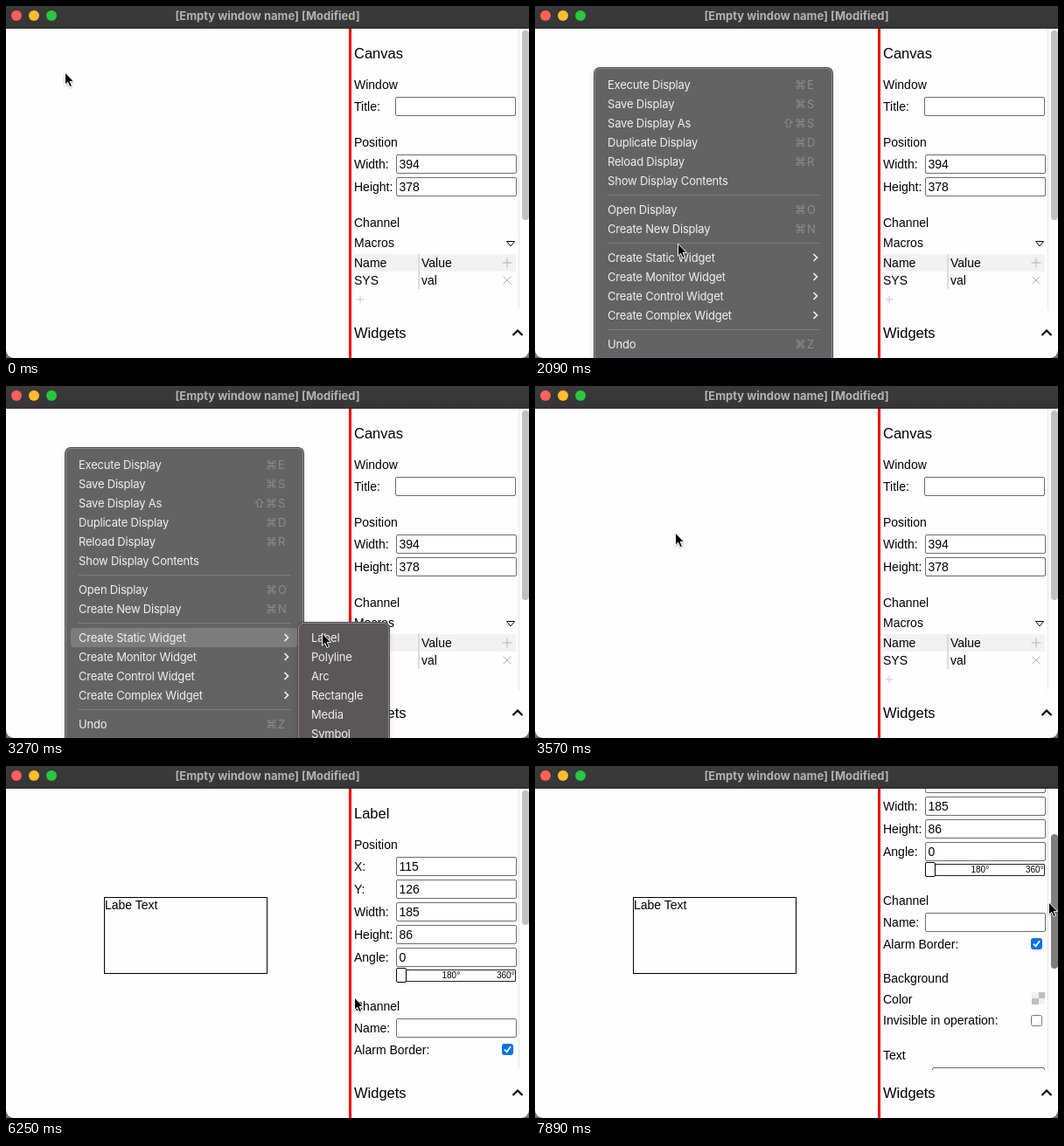
Write an HTML page that moves like this. It is 598 by 403 pixels and loops after 8000 ms.

```html
<!DOCTYPE html>
<html lang="en">
<head>
<meta charset="utf-8">
<title>Display editor</title>
<style>
html, body { margin: 0; width: 100%; height: 100%; overflow: hidden; background: #6d6d6d; }
#win { position: absolute; left: 0; top: 0; width: 598px; height: 403px; overflow: hidden;
  background: #fefefe; border-radius: 0 0 9px 9px; color: #000;
  font: 14px/20px "Liberation Sans", Arial, sans-serif; cursor: default; }
#win div, #win svg, #win i { position: absolute; box-sizing: border-box; white-space: nowrap; }
#bar { left: 0; top: 0; width: 598px; height: 26px; background: linear-gradient(#393a39, #353635);
  border-bottom: 1px solid #2a2b2a; color: #b4b4b3; text-align: center;
  font: 700 13px/22px Inter, sans-serif; }
.light { top: 5px; width: 12px; height: 12px; border-radius: 50%; }
#split { left: 392px; top: 26px; width: 3px; height: 377px; background: #f00; }
#clip { left: 395px; top: 26px; width: 203px; height: 322px; overflow: hidden; background: #fefefe; }
.page { left: -395px; top: -26px; width: 598px; height: 600px; }
.head { font-size: 16.5px; }
.field { width: 138px; height: 22px; border: 1px solid #6c6c6c; border-radius: 2px;
  background: #fff; padding-left: 3px; }
.check { left: 567px; width: 13px; height: 13px; border: 1px solid #767676; border-radius: 2.5px; background: #fff; }
.check.on { background: #0b72e7; border-color: #0b72e7; }
.tick { font-size: 10px; }
#track { left: 191px; top: 0; width: 12px; height: 322px; background: #fefefe; border-left: 1px solid #e6e6e6; }
#thumb { left: 590px; width: 8px; border-radius: 4px; }
#label { top: 150px; border: 1px solid #000; overflow: hidden; line-height: 16px; }
.menu { border: 1px solid #8b8c8e; border-radius: 6px; height: 400px; color: #f1f1f1;
  font: 13px/22px Inter, sans-serif; letter-spacing: -.2px;
  box-shadow: 0 0 0 1px #4a4b4d, 0 2px 9px rgba(0, 0, 0, .12); }
#main { left: 68px; top: 71px; width: 272px; background: #626365; }
#sub { left: 334px; top: 271px; width: 104px; background: #5b5658; }
.row { left: 5px; right: 5px; height: 22px; padding-left: 9px; border-radius: 4px; }
.row i { font-style: normal; color: #8b8c8e; top: 0; }
.row.hot { background: #3a76d8; color: #fff; }
.row.dim { background: #7b7c7e; }
.sep { left: 14px; right: 14px; height: 1px; background: #7e7f81; }
#win svg { overflow: visible; fill: none; }
</style>
</head>
<body>
<div id="win">
  <div id="bar">[Empty window name] [Modified]</div>
  <div class="light" style="left:6px;background:#fe5f58"></div>
  <div class="light" style="left:26px;background:#febc2e"></div>
  <div class="light" style="left:46px;background:#28c840"></div>
  <div id="label">Labe Text</div>
  <div id="split"></div>
  <div id="clip">
    <div class="page" id="canvasPage"></div>
    <div class="page" id="labelPage"></div>
    <div id="track"></div>
  </div>
  <div id="thumb"></div>
  <div id="foot"></div>
  <div id="menus">
    <div class="menu" id="main"></div>
    <div class="menu" id="sub"></div>
  </div>
  <svg id="arrow" width="12" height="18" style="left:0;top:0;filter:drop-shadow(0 1px 1px rgba(0,0,0,.3))">
    <path d="M.5 0V14.3L3.7 11.3L6 16.6L8.5 15.5L6.2 10.4H10.6Z" fill="#000" stroke="#fff"/>
  </svg>
</div>
<script>
const $ = id => document.getElementById(id);

function add(parent, cls, style, text = '', tag = 'div') {
  const el = document.createElement(tag);
  el.className = cls;
  for (const k in style) el.style[k] = typeof style[k] === 'number' ? style[k] + 'px' : style[k];
  el.textContent = text;
  parent.append(el);
  return el;
}
// Text is placed by its left edge and the middle of its line.
const text = (parent, x, cy, str, cls = '') => add(parent, cls, { left: x, top: cy - 10 }, str);
const field = (parent, cy, value = '', x = 445.5) =>
  add(parent, 'field', { left: x, top: cy - 11 }, value);
const icon = (parent, d, color, width = 1) => parent.insertAdjacentHTML('beforeend',
  `<svg width="1" height="1" style="left:0;top:0"><path d="${d}" stroke="${color}" stroke-width="${width}"/></svg>`);
const box = (parent, x, y, w, h, color) =>
  add(parent, '', { left: x, top: y, width: w, height: h, background: color });

// Canvas properties
const cp = $('canvasPage');
text(cp, 398, 54, 'Canvas', 'head');
text(cp, 398, 90, 'Window');
text(cp, 398, 115, 'Title:');
field(cp, 115, '', 444.5);
text(cp, 398, 156, 'Position');
text(cp, 398, 181, 'Width:');
field(cp, 181, '394');
text(cp, 398, 207, 'Height:');
field(cp, 207, '378');
text(cp, 398, 248, 'Channel');
text(cp, 398, 271, 'Macros');
icon(cp, 'M572.5 269.5H581.5L577 275Z', '#000');
box(cp, 398, 284, 185, 20, '#f2f2f2');
box(cp, 471, 284, 1.5, 40, '#dcdcdc');
text(cp, 398, 294, 'Name');
text(cp, 475, 294, 'Value');
text(cp, 398, 313.5, 'SYS');
text(cp, 475, 313.5, 'val');
icon(cp, 'M567.5 294H578.5M573 288.5V299.5M568.5 309.5L577.5 318.5M577.5 309.5L568.5 318.5', '#b4b4b4');
icon(cp, 'M400.5 336H409.5M405 331.5V340.5', '#c8c8c8');

// Label properties
const lp = $('labelPage');
text(lp, 398, 54, 'Label', 'head');
text(lp, 398, 90, 'Position');
const [xIn, yIn, wIn, hIn, aIn] = ['X:', 'Y:', 'Width:', 'Height:', 'Angle:'].map((name, i) => {
  const cy = 115 + i * 26;
  text(lp, 398, cy, name);
  return field(lp, cy);
});
yIn.textContent = '126';
aIn.textContent = '0';
add(lp, '', { left: 446, top: 233, width: 137, height: 14, border: '1px solid #222', borderRadius: 1 });
add(lp, '', { left: 446, top: 231, width: 12, height: 17, border: '1px solid #000', borderRadius: 2, background: '#fff' });
text(lp, 498.5, 239.5, '180°', 'tick');
text(lp, 561, 239.5, '360°', 'tick');
text(lp, 398, 275, 'Channel');
text(lp, 398, 300, 'Name:');
field(lp, 300);
text(lp, 398, 324.5, 'Alarm Border:');
add(lp, 'check on', { top: 318 });
icon(lp, 'M570 324.7L572.6 327.3L577 321.2', '#fff', 1.8);
text(lp, 398, 364, 'Background');
text(lp, 398, 388, 'Color');
box(lp, 568, 380, 15, 14, '#f2f2f2');
box(lp, 575.5, 380, 7.5, 7, '#bebebe');
box(lp, 568, 387, 7.5, 7, '#bebebe');
text(lp, 398, 412, 'Invisible in operation:');
add(lp, 'check', { top: 405.5 });
text(lp, 398, 451.5, 'Text');
field(lp, 477, '', 453.5).style.width = '129px';

text($('foot'), 398, 374, 'Widgets', 'head');
icon($('foot'), 'M579.5 377L585 371.5L590.5 377', '#000', 2.2);

// Menus: "name|shortcut", ">" opens a submenu, "-" is a separator
function fillMenu(menu, first, items) {
  const top = parseInt(getComputedStyle(menu).top) + 1;
  const rows = [];
  let cy = first;
  for (const item of items) {
    if (item === '-') {
      add(menu, 'sep', { top: cy - 6 - top });
      cy += 11;
      continue;
    }
    const [name, key = ''] = item.split('|');
    const el = add(menu, 'row', { top: cy - 11 - top }, name);
    if (key === '>') icon(el, 'M244.5 7L248.5 11L244.5 15', '#f1f1f1', 1.7);
    else [...key].reverse().forEach((ch, i) => add(el, '', { left: [237, 223, 209][i] }, ch, 'i'));
    rows.push({ el, cy });
    cy += 22;
  }
  return rows;
}
const mainRows = fillMenu($('main'), 89.5, [
  'Execute Display|⌘E', 'Save Display|⌘S', 'Save Display As|⇧⌘S', 'Duplicate Display|⌘D',
  'Reload Display|⌘R', 'Show Display Contents', '-', 'Open Display|⌘O', 'Create New Display|⌘N', '-',
  'Create Static Widget|>', 'Create Monitor Widget|>', 'Create Control Widget|>',
  'Create Complex Widget|>', '-', 'Undo|⌘Z']);
const subRows = fillMenu($('sub'), 287.5, ['Label', 'Polyline', 'Arc', 'Rectangle', 'Media', 'Symbol']);

// Pointer: time, x, y; each place is held until the next
const path = [
  [0, 67, 76], [1640, 70, 82], [1790, 88, 121], [1940, 131, 212], [2090, 163, 272],
  [2240, 172, 284], [2390, 185, 286], [2540, 215, 287], [2680, 262, 287], [2830, 318, 286],
  [2980, 361, 283], [3420, 280, 236], [3570, 160, 168], [3720, 128, 155], [3870, 116, 151],
  [4020, 114, 150], [4170, 128, 158], [4310, 174, 182], [4450, 238, 216], [4600, 282, 233],
  [4900, 286, 234], [5050, 291, 235], [5200, 296, 236], [5350, 298, 236], [5800, 310, 241],
  [5950, 342, 252], [6100, 380, 262], [6250, 398, 265], [6550, 424, 258], [6700, 494, 207],
  [6850, 560, 133], [6990, 587, 106], [7590, 587, 118], [7740, 587, 138], [7890, 587, 156]];
const T = { menu: 1340, sub: 2390, pick: 3270, fade: 3420, shut: 3570, press: 4170, drop: 5650, grab: 6990 };
const show = (el, on) => { el.style.display = on ? '' : 'none'; };

function drawMenus(t, x, y) {
  const open = t >= T.menu && t < T.shut, subOpen = t >= T.sub;
  show($('menus'), open);
  if (!open) return;
  $('menus').style.opacity = t >= T.fade ? .3 : 1;
  show($('sub'), subOpen);
  const inSub = subOpen && x >= 334;
  const picked = t >= T.pick;
  mainRows.forEach(({ el, cy }, i) => {
    const over = x >= 69 && Math.abs(y - cy) < 11;
    el.classList.toggle('hot', over && !inSub && !picked);
    el.classList.toggle('dim', i === 8 && (inSub || picked));
  });
  subRows.forEach(({ el, cy }) =>
    el.classList.toggle('hot', inSub && !picked && Math.abs(y - cy) < 11));
}

function drawLabel(t, x, y) {
  const on = t >= T.press, done = t >= T.drop;
  show($('label'), on);
  show(lp, on);
  show(cp, !on);
  const left = done ? 112 : 114;
  const w = done ? 185 : x - 115, h = done ? 86 : y - 151;
  Object.assign($('label').style, { left: left + 'px', width: w + 2 + 'px', height: h + 2 + 'px' });
  xIn.textContent = left + 3;
  wIn.textContent = w;
  hIn.textContent = h;
}

function drawScroll(t, y) {
  const held = t >= T.grab, shift = held ? y - 106 : 0;
  lp.style.top = -26 - Math.round(shift * 2.42) + 'px';
  Object.assign($('thumb').style, {
    top: 28 + shift + 'px',
    height: (t >= T.press ? 154 : 217) + 'px',
    background: held ? '#7f7f7f' : '#c1c1c1' });
}

function draw(t) {
  const [, x, y] = path.findLast(p => p[0] <= t);
  $('arrow').style.transform = `translate(${x}px, ${y}px)`;
  drawMenus(t, x, y);
  drawLabel(t, x, y);
  drawScroll(t, y);
}

const start = performance.now();
function tick() {
  draw((performance.now() - start) % 8000);
  requestAnimationFrame(tick);
}
tick();
</script>
</body>
</html>
```
